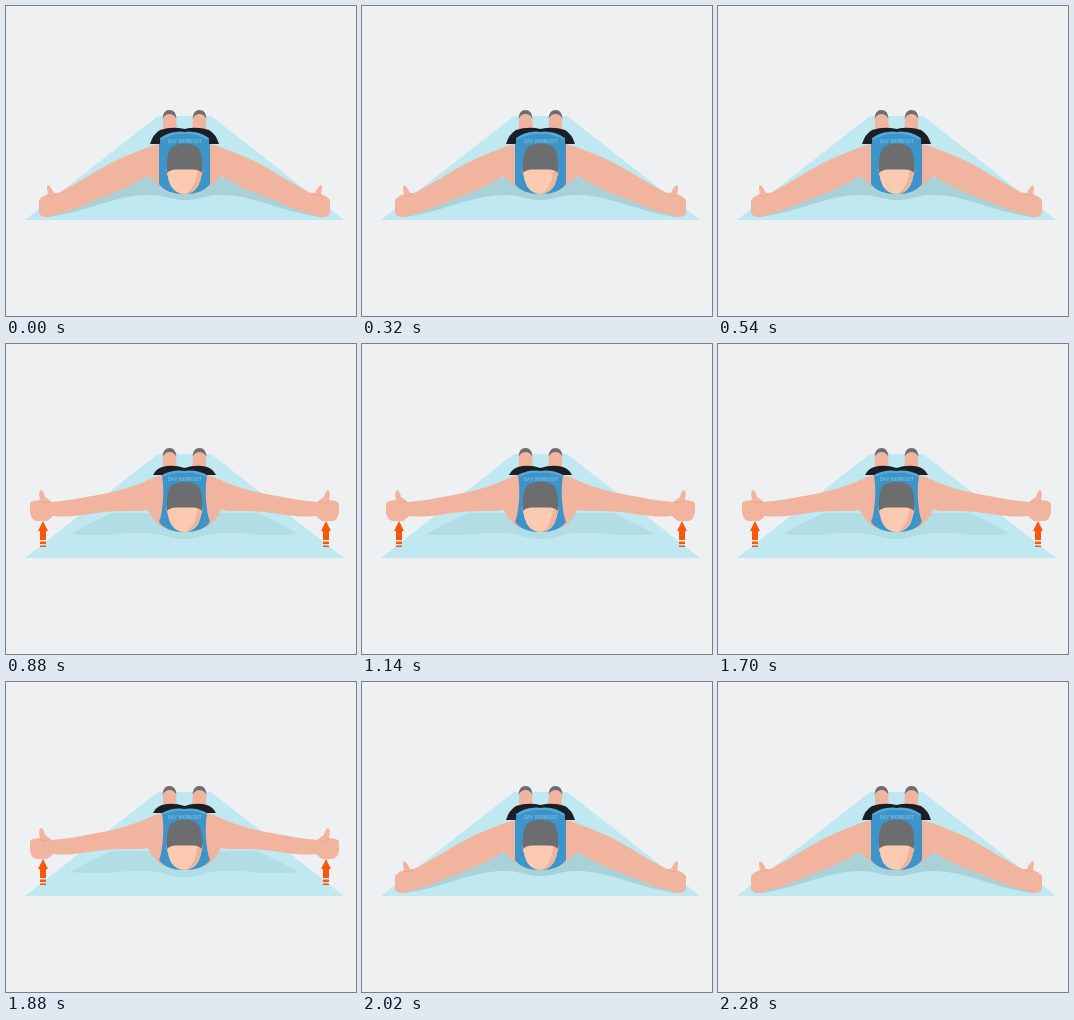
These frames come from a looping animation (350x310 px, 2300 ms). An HTML page:

```html
<!DOCTYPE html>
<html lang="en">
<head>
<meta charset="utf-8">
<title>Prone arm raise</title>
<style>
  html, body { margin: 0; width: 100%; height: 100%; overflow: hidden; background: #eef0f2; }
  svg { display: block; width: 100vw; height: 100vh; }
  .skin { fill: #f1b59f; }
  .crease { fill: none; stroke: #e5a590; stroke-width: .8; }
  .hair { fill: #6c6d6f; }
  .shorts { fill: #1d1e23; }
  .shirt { fill: #3c94c8; }
  .trim { fill: none; stroke: #55abd8; stroke-width: 2; }
  .arrow { fill: #fa560c; }
  text { font: 5px Roboto, Arial, sans-serif; fill: #8cc6e4; text-anchor: middle; }
</style>
</head>
<body>
<svg viewBox="0 0 350 310">
  <defs>
    <g id="leg">
      <path class="skin" d="M157 125 L157 113 Q158 106 163.500 106 Q169 106 170 113 L171 125 Z"/>
      <path class="hair" d="M156.500 113 Q157 104 163.500 104 Q170 104 170.500 113 Q168 108 163.500 108 Q159 108 156.500 113 Z"/>
    </g>
    <g id="lowArm">
      <path class="skin" d="M154 138 C143 140 133 145 120 150 C102 157 83 170 67 179 Q58 184 52 187 L48 187 Q45 180 42 179 Q40 180 42 188 Q36 190 33 194 L33 207 Q35 211 40 211 Q46 211 50 208 C67 205 81 197 98 191 C114 185 129 178 141 170 Q148 175 154 181 Z"/>
      <path class="crease" d="M42 189 Q46 191 51 188"/>
    </g>
    <g id="highArm">
      <path class="skin" d="M158 131 C148 132 142 137 130 141 C108 149 86 152 64 156 L46 158 Q42 155 39 153 Q38 147 35 146 Q32 147 34 156 Q27 156 24 159 L24 169 Q26 177 31 177 L41 177 Q44 175 47 172 C67 174 79 170 98 168 C117 166 131 168 142 166 Q146 176 158 185 Z"/>
      <path class="crease" d="M34 157 Q38 160 44 158"/>
    </g>
    <path id="arrow" class="arrow" d="M37 177 L42 187 H40 V196 H34 V187 H32 Z M34 197.500 H40 V200 H34 Z M34 201.500 H40 V203 H34 Z"/>
    <g id="head">
      <path fill="#f2b59d" d="M162 161 Q159 164 162 171 L195 171 Q198 164 195 161 Z"/>
      <path fill="#fbcab1" d="M162 160 H195 Q197 176 189 184 Q184 188 178.500 188 Q173 188 168 184 Q160 176 162 160 Z"/>
      <path fill="#efb29b" d="M195 163 Q196 184 180 188 Q190 181 191 166 Z"/>
      <path class="hair" d="M161 167 Q160 148 165 142 Q170 137.500 178.500 137.500 Q187 137.500 192 142 Q197 148 196 167 Q193 163.500 187 163.500 H170 Q164 163.500 161 167 Z"/>
    </g>
  </defs>

  <path fill="#bfe8f1" d="M152 110 H205 L338 214 H19 Z"/>

  <g id="low">
    <path fill="#a9d1d8" d="M40 211 C72 209 107 190 138 189 C157 188 164 194 178.500 194 C193 194 200 188 219 189 C250 190 285 209 317 211 L218 171 H139 Z"/>
    <use href="#leg"/><use href="#leg" class="flip"/>
    <path class="shorts" d="M144 138 Q147 128 154 124 Q166 120 178.500 123 Q191 120 203 124 Q210 128 213 138 Z"/>
    <use href="#lowArm"/><use href="#lowArm" class="flip"/>
    <path class="shirt" d="M153 138 Q163 134 165 127 Q178.500 125 192 127 Q194 134 204 138 V178 Q197 188 178.500 188 Q160 188 153 178 Z"/>
    <path class="shirt" d="M154 132 Q166 124 178.500 126 Q191 124 203 132 V142 H154 Z"/>
    <path class="trim" d="M155 133 Q166 126 178.500 127 Q191 126 202 133"/>
    <text x="179" y="137" >DAY WORKOUT</text>
    <use href="#head"/>
  </g>

  <g id="high">
    <path fill="#b2dde5" d="M65 190 Q83 179 106 169 H251 Q274 179 292 190 C260 194 235 187 216 189 C198 190 193 195 178.500 195 C164 195 159 190 141 189 C122 187 97 194 65 190 Z"/>
    <use href="#leg"/><use href="#leg" class="flip"/>
    <path class="shorts" d="M147 131 Q150 125 156 123 Q167 120 178.500 124 Q190 120 201 123 Q207 125 210 131 Z"/>
    <use href="#highArm"/><use href="#highArm" class="flip"/>
    <path class="shirt" d="M156 131 Q166 125 178.500 127 Q191 125 201 131 Q199 145 200 156 Q201 171 204 178 Q197 188 178.500 188 Q160 188 153 178 Q156 171 157 156 Q158 145 156 131 Z"/>
    <path class="trim" d="M157 132 Q167 127 178.500 128 Q190 127 200 132"/>
    <text x="179" y="137">DAY WORKOUT</text>
    <use href="#head"/>
    <use href="#arrow"/><use href="#arrow" class="flip"/>
  </g>
</svg>
<script>
  const LOOP = 2300, RAISE = 860, LOWER = 1970;
  const low = document.getElementById("low");
  const high = document.getElementById("high");

  for (const part of document.querySelectorAll(".flip")) {
    part.setAttribute("transform", "translate(357 0) scale(-1 1)");
  }

  function draw() {
    const t = performance.now() % LOOP;
    const raised = t >= RAISE && t < LOWER;
    low.style.display = raised ? "none" : "";
    high.style.display = raised ? "" : "none";
    requestAnimationFrame(draw);
  }
  draw();
</script>
</body>
</html>
```
